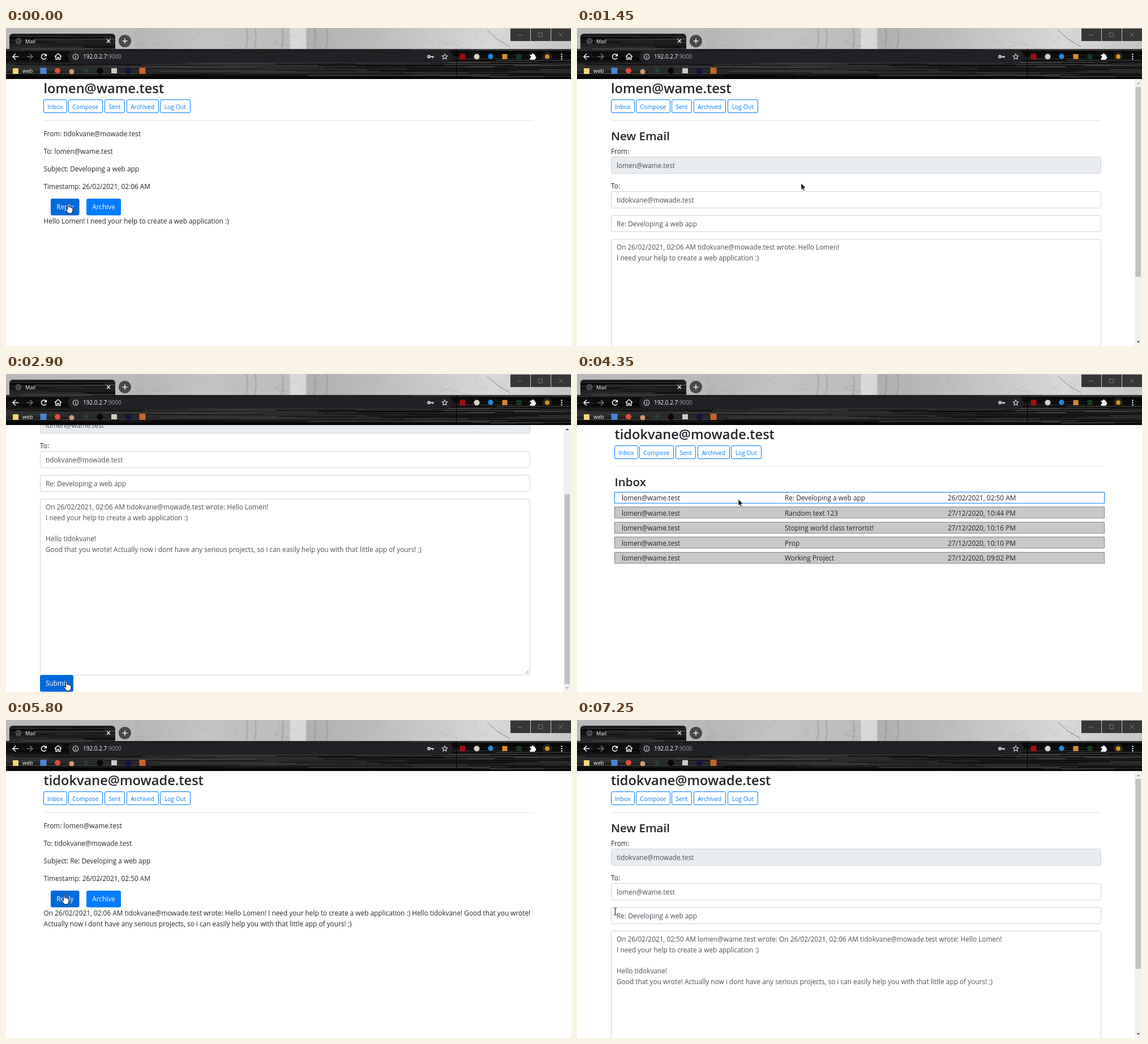
Write an HTML page with a canvas that moves like this. It is 998x561 px and loops after 8000 ms.

```html
<!DOCTYPE html>
<html lang="en">
<head>
<meta charset="utf-8">
<title>Mail</title>
<style>
html, body { margin: 0; width: 100%; height: 100%; overflow: hidden; background: #fff; }
canvas { display: block; }
</style>
</head>
<body>
<canvas id="stage" width="998" height="561"></canvas>
<script>
const W = 998, H = 561, LOOP = 8000, STEP = 1450;
const FONT = '"Open Sans", "Noto Sans", sans-serif';
const INK = '#212529', FIELD_INK = '#495057', BLUE = '#007bff', BLUE_HOVER = '#0069d9';
const LOMEN = 'lomen@wame.test', TIDOK = 'tidokvane@mowade.test';
const SUBJECT = 'Re: Developing a web app';
const ASK = 'I need your help to create a web application :)';
const OFFER = 'Actually now i dont have any serious projects, so i can easily help you with that little app of yours! ;)';
const QUOTE = `On 26/02/2021, 02:06 AM ${TIDOK} wrote: Hello Lomen!`;
const ANSWER = ['', 'Hello tidokvane!', 'Good that you wrote! ' + OFFER];

const stage = document.getElementById('stage').getContext('2d');
let ctx = stage;

function seeded(seed) {
  return () => (seed = (seed * 16807) % 2147483647) / 2147483647;
}

function rect(x, y, w, h, color) {
  ctx.fillStyle = color;
  ctx.fillRect(x, y, w, h);
}

function dot(x, y, r, color) {
  ctx.fillStyle = color;
  ctx.beginPath();
  ctx.arc(x, y, r, 0, 7);
  ctx.fill();
}

function box(x, y, w, h, r, fill, border) {
  ctx.beginPath();
  ctx.roundRect(x, y, w, h, r);
  if (fill) { ctx.fillStyle = fill; ctx.fill(); }
  if (border) { ctx.strokeStyle = border; ctx.lineWidth = 1; ctx.stroke(); }
}

function line(color, width, ...pts) {
  ctx.strokeStyle = color;
  ctx.lineWidth = width;
  ctx.beginPath();
  for (let i = 0; i < pts.length; i += 2) ctx.lineTo(pts[i], pts[i + 1]);
  ctx.stroke();
}

function arc(x, y, r, color, width = 1, from = 0, to = Math.PI * 2) {
  ctx.strokeStyle = color;
  ctx.lineWidth = width;
  ctx.beginPath();
  ctx.arc(x, y, r, from, to);
  ctx.stroke();
}

function gradient(x, y, stops) {
  const g = ctx.createLinearGradient(0, 0, x, y);
  stops.forEach(s => g.addColorStop(...s));
  return g;
}

function text(str, x, y, { size = 11.85, color = INK, weight = 400, align = 'left' } = {}) {
  ctx.font = `${weight} ${size}px ${FONT}`;
  ctx.textAlign = align;
  ctx.fillStyle = color;
  ctx.fillText(str, x, y);
}

function shape(d, x, y, fill, border, width = 1) {
  const p = new Path2D(d);
  ctx.save();
  ctx.translate(x, y);
  ctx.lineJoin = 'round';
  if (fill) { ctx.fillStyle = fill; ctx.fill(p); }
  if (border) { ctx.strokeStyle = border; ctx.lineWidth = width; ctx.stroke(p); }
  ctx.restore();
}

// Browser window

function mist() {
  rect(0, 0, W, 38, gradient(W, 0, [
    [0, '#b8b8b8'], [.228, '#bababa'], [.229, '#b6b6b6'], [.35, '#c3c3c3'], [.502, '#bcbcbc'],
    [.503, '#dadada'], [.531, '#d6d6d6'], [.532, '#b0b0b0'], [.64, '#bbb'],
    [.78, '#cdcdcd'], [.86, '#d8d8d8'], [1, '#c4c4c4']]));
  const rnd = seeded(77);
  for (let i = 0; i < 34; i++) {
    const x = i < 17 ? 235 + rnd() * 255 : 535 + rnd() * 345;
    const y = rnd() * 28;
    line('rgba(120,120,120,.25)', .7, x, y, x + rnd() * 34 - 17, y + 8, x + rnd() * 60 - 30, y + 15);
  }
  for (const x of [425, 440, 488, 545, 566])
    line('rgba(95,95,95,.18)', 3, x, 0, x + 2, 18, x - 1, 38);
  line('rgba(90,90,90,.4)', 1.5, 850, 4, 868, 20, 890, 33);
}

function wood() {
  ctx.save();
  ctx.beginPath();
  ctx.roundRect(6, 10, 187, 40, 6);
  ctx.rect(0, 37, W, 53);
  ctx.clip();
  rect(0, 0, W, 90, gradient(0, 90, [
    [.11, '#2c2c2c'], [.17, '#080808'], [.3, '#1c1c1c'], [.41, '#2e2e2e'], [.46, '#0c0c0c'],
    [.66, '#121212'], [.73, '#303030'], [.88, '#262626'], [.96, '#080808']]));
  const rnd = seeded(4211);
  for (let i = 0; i < 150; i++) {
    const x = rnd() * W - 90, y = 10 + rnd() * 78, len = 80 + rnd() * 280, bend = rnd() * 4 - 2;
    const v = i % 2 ? 4 : Math.floor(35 + rnd() * 55);
    ctx.strokeStyle = `rgba(${v},${v},${v},.75)`;
    ctx.lineWidth = .6 + rnd() * 1.5;
    ctx.beginPath();
    ctx.moveTo(x, y);
    ctx.bezierCurveTo(x + len / 3, y + bend, x + len * .7, y - bend, x + len, y);
    ctx.stroke();
  }
  rect(795, 37, 1, 53, '#000');
  rect(0, 88, W, 2, '#050505');
  ctx.restore();
}

function tabStrip() {
  dot(22, 23, 5.5, '#4b4b4b');
  line('#222', 1, 18, 21, 23, 22, 21, 26);
  text('Mail', 34, 27, { size: 9.2, color: '#fff' });
  line('#fff', 1.2, 178, 20, 184, 26);
  line('#fff', 1.2, 184, 20, 178, 26);
  dot(210, 23, 11, '#484848');
  line('#fff', 1.4, 205.5, 23, 214.5, 23);
  line('#fff', 1.4, 210, 18.5, 210, 27.5);
  for (const x of [891, 927, 963]) rect(x, 1, 35, 22, '#363636');
  line('#777', 1, 904, 12.5, 912, 12.5);
  box(940.5, 8.5, 7, 7, 0, null, '#777');
  line('#777', 1, 976, 8, 984, 16);
  line('#777', 1, 984, 8, 976, 16);
}

function navArrow(x, dir, color) {
  line(color, 1.5, x - 5 * dir, 50.5, x + 5 * dir, 50.5);
  line(color, 1.5, x, 45.5, x + 5 * dir, 50.5, x, 55.5);
}

function toolbar() {
  navArrow(17, -1, '#fff');
  navArrow(42, 1, '#777');
  arc(67, 50.5, 4.5, '#fff', 1.5, .5, 5.6);
  shape('M0 0V5H-5Z', 72, 45, '#fff');
  shape('M-6 0L0-5.5L6 0M-4-1V5H-1.3V1.5H1.3V5H4V-1', 92, 50.5, null, '#fff', 1.4);
  box(110, 39.5, 679, 22, 11, '#202124');
  arc(123, 50.5, 4.7, '#ddd', 1.1);
  rect(122.4, 49.5, 1.2, 4, '#ddd');
  rect(122.4, 47.3, 1.2, 1.2, '#ddd');
  text('192.0.2.7', 136, 54.3, { size: 10, color: '#fff' });
  const hostWidth = ctx.measureText('192.0.2.7').width;
  text(':9000', 136 + hostWidth, 54.3, { size: 10, color: '#9aa0a6' });
  arc(747, 50.5, 2, '#ddd', 1.8);
  line('#ddd', 1.8, 749, 50.5, 756, 50.5);
  line('#ddd', 1.8, 753.5, 50.5, 753.5, 53);
  shape('M0-5L1.4-1.6L5-1.4L2.2 .9L3.1 4.5L0 2.5L-3.1 4.5L-2.2 .9L-5-1.4L-1.4-1.6Z', 775, 50.5, null, '#ddd', 1.1);

  box(801.5, 45.5, 10, 10, 0, '#a30d14');
  dot(831.5, 50.5, 5, '#d8d2c8');
  dot(856, 50, 4.7, '#2488dc');
  box(876.5, 46, 9, 9, 0, '#d98a35');
  box(901.5, 46, 9, 9, 0, '#183a20');
  shape('M-5-3H-2A2 2 0 1 1 2-3H4V0A2 2 0 1 1 4 4V6H-5V3A2 2 0 0 0-5-1Z', 930.5, 50, '#fff');
  dot(956, 50.5, 8.5, '#25211b');
  dot(956, 50.5, 4, '#d29224');
  for (const y of [46.5, 50.5, 54.5]) dot(981.5, y, 1.2, '#fff');
}

function bookmarks() {
  box(12, 71, 10, 10, 1, '#f7d774');
  text('web', 29, 79, { size: 9.6, color: '#fff' });
  box(60.5, 70, 11, 11, 0, '#4a84d8');
  dot(91, 75.5, 5, '#e34a3b');
  dot(116, 77, 4.5, '#d19a72');
  dot(141.5, 75.5, 4, '#25432a');
  dot(166, 75.5, 5.5, '#080808');
  box(186, 71, 10, 9, 0, '#ccc');
  dot(216, 75.5, 6, '#15153f');
  box(235.5, 70, 11, 11, 0, '#c7652b');
}

function browserLayer() {
  const layer = document.createElement('canvas');
  layer.width = W;
  layer.height = 91;
  ctx = layer.getContext('2d');
  [mist, wood, tabStrip, toolbar, bookmarks].forEach(draw => draw());
  ctx = stage;
  return layer;
}

// Mail pages

function header(user, x) {
  text(user, x, 115, { size: 23.6, weight: 600 });
  const items = [['Inbox', 0, 40.5], ['Compose', 44, 59.5], ['Sent', 107.5, 35],
                 ['Archived', 146.5, 55.5], ['Log Out', 206, 52.5]];
  for (const [label, dx, w] of items) {
    const left = Math.floor(x + dx) + .5;
    box(left, 126.5, Math.round(w), 23, 2.5, null, BLUE);
    text(label, left + w / 2, 143, { size: 10.4, color: BLUE, align: 'center' });
  }
  rect(x, 163, 865.5, 1, '#e5e5e5');
}

function title(str, x) {
  text(str, x, 198, { size: 20.5, weight: 600 });
}

function button(label, x, y, w, color) {
  box(x, y, w, 29.5, 3, color);
  text(label, x + w / 2, y + 19, { color: '#fff', align: 'center' });
}

function messagePage(user, from, to, subject, stamp, body) {
  header(user, 66.5);
  ['From: ' + from, 'To: ' + to, 'Subject: ' + subject, 'Timestamp: ' + stamp]
    .forEach((s, i) => text(s, 66.5, 190.5 + i * 31.2));
  button('Reply', 79, 301, 50.5, BLUE_HOVER);
  button('Archive', 142, 301, 61, BLUE);
  body.forEach((s, i) => text(s, 66.5, 345 + i * 18.7));
}

function field(y, value, fill = '#fff') {
  box(60.5, y + .5, 865, 29, 3, fill, '#ced4da');
  text(value, 70, y + 20, { color: FIELD_INK });
}

function composePage(user, to, body, scroll = 0) {
  ctx.save();
  ctx.translate(0, -scroll);
  header(user, 60);
  title('New Email', 60);
  text('From:', 60, 222);
  field(227, user, '#e9ecef');
  text('To:', 60, 283);
  field(288, to);
  field(330, SUBJECT);
  box(60.5, 372.5, 865, 310.5, 3, '#fff', '#ced4da');
  body.forEach((s, i) => text(s, 70, 391 + i * 18.7, { color: FIELD_INK }));
  line('#777', 1, 917, 681, 923, 675);
  line('#777', 1, 921, 681, 923, 679);
  button('Submit', 60, 683, 59, BLUE_HOVER);
  ctx.restore();
  scrollbar(scroll);
}

function scrollbar(scroll) {
  rect(985, 91, 13, 470, '#f1f1f1');
  rect(986.5, scroll ? 212 : 104, 9.5, 335, '#c1c1c1');
  shape('M-3 1.5L0-1.5L3 1.5Z', 991.5, 97.5, scroll ? '#505050' : '#a3a3a3');
  shape('M-3-1.5L0 1.5L3-1.5Z', 991.5, 554, scroll ? '#a3a3a3' : '#505050');
}

function inboxPage() {
  header(TIDOK, 66.5);
  title('Inbox', 66.5);
  const mails = [
    [SUBJECT, '26/02/2021, 02:50 AM'],
    ['Random text 123', '27/12/2020, 10:44 PM'],
    ['Stoping world class terrorist!', '27/12/2020, 10:16 PM'],
    ['Prop', '27/12/2020, 10:10 PM'],
    ['Working Project', '27/12/2020, 09:02 PM']
  ];
  mails.forEach(([subject, stamp], i) => {
    const y = 208 + i * 26.5;
    box(66.5, Math.floor(y) + .5, 865, 19.5, 0, i ? '#c8c8c8' : '#fff', i ? '#808080' : BLUE);
    text(LOMEN, 79, y + 15);
    text(subject, 367, y + 15);
    text(stamp, 655, y + 15);
  });
}

// Pointers

function arrow(x, y) {
  shape('M0 0V11.5L2.6 9L4.4 13L6.2 12.2L4.4 8.3H8Z', x, y, '#000', '#fff', .6);
}

function hand(x, y) {
  shape('M0 .5C0-1 2.4-1 2.4 .5V5C3 4.2 5 4.3 5 5.6C5.6 4.8 7.3 5 7.3 6.3C8 5.6 9.5 6 9.5 7.2V11.5L8 16H1.5L-3 10C-3.5 8.4-2 7.8 0 10Z',
    x, y, '#fff', '#000', 1);
}

function beam(x, y) {
  shape('M-2.5-6H-.7L0-5.3L.7-6H2.5M0-5.3V5.3M-2.5 6H-.7L0 5.3L.7 6H2.5', x, y, null, '#000', 1);
}

const scenes = [
  () => {
    messagePage(LOMEN, TIDOK, LOMEN, 'Developing a web app', '26/02/2021, 02:06 AM', ['Hello Lomen! ' + ASK]);
    hand(108.5, 311);
  },
  () => {
    composePage(LOMEN, TIDOK, [QUOTE, ASK]);
    arrow(396, 274);
  },
  () => {
    composePage(LOMEN, TIDOK, [QUOTE, ASK, ...ANSWER], 152);
    hand(105.5, 543);
  },
  () => {
    inboxPage();
    arrow(285, 221);
  },
  () => {
    messagePage(TIDOK, LOMEN, TIDOK, SUBJECT, '26/02/2021, 02:50 AM',
      [`${QUOTE} ${ASK} Hello tidokvane! Good that you wrote!`, OFFER]);
    hand(101.5, 309);
  },
  () => {
    composePage(TIDOK, LOMEN, [`On 26/02/2021, 02:50 AM ${LOMEN} wrote: ${QUOTE}`, ASK, ...ANSWER]);
    beam(67.5, 338);
  }
];

const browser = browserLayer();

function render(now) {
  const index = Math.floor((now % LOOP) / STEP);
  rect(0, 0, W, H, '#fff');
  scenes[index]();
  ctx.drawImage(browser, 0, 0);
  requestAnimationFrame(render);
}

render(0);
</script>
</body>
</html>
```
